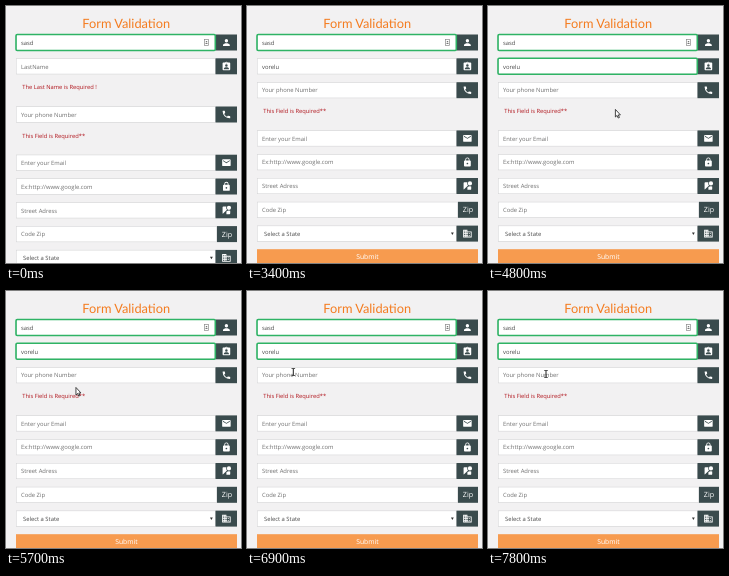
These frames come from a looping animation (235x257 px, 8 s). An HTML page with a canvas:

```html
<!DOCTYPE html>
<html lang="en">
<head>
<meta charset="utf-8">
<title>Form Validation</title>
<style>
html, body { margin: 0; width: 235px; height: 257px; overflow: hidden; background: #f2f1f2; }
canvas { display: block; width: 235px; height: 257px; }
</style>
</head>
<body>
<canvas id="stage"></canvas>
<script>
const W = 235, H = 257, LOOP = 8000;
const FILLED = 3400, VALID = 4400, POINTER_IN = 4300;
const BODY = '"Open Sans", "Noto Sans", sans-serif', HEAD = 'Lato, sans-serif';
const DARK = '#3a4b4d', GREEN = '#2fb365', RED = '#b0141c', INK = '#4a4a4a', HINT = '#6f6f6f';

const canvas = document.getElementById('stage');
const ctx = canvas.getContext('2d');
const dpr = window.devicePixelRatio || 1;
canvas.width = W * dpr;
canvas.height = H * dpr;

// 24 x 24 glyphs
const icons = {
  person: 'M12 12a4 4 0 1 0 0-8a4 4 0 0 0 0 8zm0 2c-2.7 0-8 1.3-8 4v2h16v-2c0-2.7-5.3-4-8-4z',
  badge: 'M19 3h-4.2a3 3 0 0 0-5.6 0H5a2 2 0 0 0-2 2v14a2 2 0 0 0 2 2h14a2 2 0 0 0 2-2V5a2 2 0 0 0-2-2z' +
    'm-7 0a1 1 0 1 1 0 2a1 1 0 0 1 0-2zm0 4a3 3 0 1 1 0 6a3 3 0 0 1 0-6zm6 12H6v-1.4c0-2 4-3.1 6-3.1s6 1.1 6 3.1z',
  phone: 'M6.6 10.8c1.5 2.8 3.8 5.1 6.6 6.6l2.2-2.2q.5-.5 1-.3q1.7.6 3.6.6a1 1 0 0 1 1 1V20a1 1 0 0 1-1 1' +
    'A17 17 0 0 1 3 4a1 1 0 0 1 1-1h3.5a1 1 0 0 1 1 1q0 1.9.6 3.6q.2.5-.3 1z',
  mail: 'M20 4H4a2 2 0 0 0-2 2v12a2 2 0 0 0 2 2h16a2 2 0 0 0 2-2V6a2 2 0 0 0-2-2zm0 4l-8 5l-8-5V6l8 5l8-5z',
  lock: 'M18 8h-1V6A5 5 0 0 0 7 6v2H6a2 2 0 0 0-2 2v10a2 2 0 0 0 2 2h12a2 2 0 0 0 2-2V10a2 2 0 0 0-2-2z' +
    'm-6 9a2 2 0 1 1 0-4a2 2 0 0 1 0 4zm3.1-9H8.9V6a3.1 3.1 0 0 1 6.2 0z',
  street: 'M12.6 14.3q-.6.5-.6 1.2V21h7a2 2 0 0 0 2-2v-6q-4.5-1.5-8.4 1.3z' +
    'M18 1a5 5 0 1 1 0 10a5 5 0 0 1 0-10zM11.5 6q0-1.6.7-3H5a2 2 0 0 0-2 2v14q0 .9.6 1.4l9.8-9.8Q11.5 8.8 11.5 6z',
  building: 'M12 7V3H2v18h20V7zM4 5h2v2H4zm0 4h2v2H4zm0 4h2v2H4zm0 4h2v2H4zM8 5h2v2H8zm0 4h2v2H8z' +
    'm0 4h2v2H8zm0 4h2v2H8zM12 9h8v10h-8v-2h2v-2h-2v-2h2v-2h-2zM16 11h2v2h-2zm0 4h2v2h-2z'
};
for (const k in icons) icons[k] = new Path2D(icons[k]);

const arrow = new Path2D('M0 0V7.6L1.7 6L2.8 8.6L4 8.1L2.9 5.5H5Z');

// [time, x, y] of the pointer
const path = [
  [4300, 127.4, 103.4], [5200, 127.4, 103.4], [5700, 70, 96.5],
  [6000, 54, 82], [6450, 44.5, 81], [6900, 46.3, 81], [7000, 47, 81.2], [7600, 58, 83]
];

const rows = [
  ['Enter your Email', 'mail'], ['Ex:http://www.google.com', 'lock'],
  ['Street Adress', 'street'], ['Code Zip', 'Zip']
];

function text(str, x, y, size, color, align = 'left', font = BODY) {
  ctx.font = size + 'px ' + font;
  ctx.textAlign = align;
  ctx.fillStyle = color;
  ctx.fillText(str, x, y);
}

function box(x, y, w, h, color) {
  ctx.fillStyle = color;
  ctx.fillRect(x, y, w, h);
}

function addon(name, x, y) {
  box(x, y - 8, 231 - x, 16, DARK);
  if (!icons[name]) {
    text(name, (x + 231) / 2, y + 2.5, 7.2, '#fff', 'center');
    return;
  }
  ctx.save();
  ctx.translate(215.3, y - 5.1);
  ctx.scale(0.425, 0.425);
  ctx.fillStyle = '#fff';
  ctx.fill(icons[name], 'evenodd');
  ctx.restore();
}

function field(y, label, icon, { color = HINT, valid = false, indent = 15 } = {}) {
  const right = icons[icon] ? 209.5 : 211;
  box(10, y - 8, right - 10, 16, '#cfcfd1');
  box(10.5, y - 7.5, right - 11, 15, '#fff');
  addon(icon, right, y);
  if (valid) {
    ctx.strokeStyle = GREEN;
    ctx.lineWidth = 1.6;
    ctx.beginPath();
    ctx.roundRect(10, y - 8, 199.3, 16, 1.2);
    ctx.stroke();
  }
  text(label, indent, y + 2.2, 5.85, color);
}

function card(x, y) {
  ctx.strokeStyle = '#8b8b8b';
  ctx.lineWidth = 0.7;
  ctx.strokeRect(x - 2, y - 3, 4, 6);
  box(x - 0.7, y - 1.5, 1.4, 1.3, '#777');
  box(x - 1, y + 0.5, 2, 1, '#777');
}

function pointer(t) {
  if (t < POINTER_IN) return;
  let i = 0;
  while (i < path.length - 2 && t >= path[i + 1][0]) i++;
  const [t0, x0, y0] = path[i], [t1, x1, y1] = path[i + 1];
  const k = Math.min(1, (t - t0) / (t1 - t0));
  const x = x0 + (x1 - x0) * k, y = y0 + (y1 - y0) * k;
  ctx.save();
  ctx.translate(x, y);
  if (y > 92) {
    ctx.strokeStyle = '#333';
    ctx.lineWidth = 0.9;
    ctx.fillStyle = '#fff';
    ctx.fill(arrow);
    ctx.stroke(arrow);
  } else {
    box(-0.5, -3.5, 1, 7, '#222');
    box(-1.8, -4, 3.6, 0.8, '#333');
    box(-1.8, 3.2, 3.6, 0.8, '#333');
  }
  ctx.restore();
}

function draw(t) {
  const filled = t >= FILLED;
  const top = filled ? 84.2 : 108.5;
  const rowY = i => top + 48.2 + i * 23.8;
  ctx.setTransform(dpr, 0, 0, dpr, 0, 0);
  ctx.textRendering = 'geometricPrecision';
  box(0, 0, W, H, '#f2f1f2');
  text('Form Validation', 120.2, 21.6, 12.8, '#f47c20', 'center', HEAD);

  field(36.5, 'sasd', 'person', { color: INK, valid: true });
  card(200.5, 36.5);
  field(60.3, filled ? 'vorelu' : 'LastName', 'badge',
    { color: filled ? INK : HINT, valid: t >= VALID });
  if (!filled) text('The Last Name is Required !', 16.3, 83.3, 5.75, RED);

  field(top, 'Your phone Number', 'phone');
  text('This Field is Required**', 16.3, top + 23, 5.75, RED);

  rows.forEach(([label, icon], i) => field(rowY(i), label, icon));

  const y = rowY(rows.length);
  field(y, 'Select a State', 'building', { color: INK, indent: 17 });
  ctx.fillStyle = '#333';
  ctx.fill(new Path2D(`M204 ${y - 1.2}h2.8l-1.4 2.5z`));

  if (filled) {
    box(10, 243.2, 221, 16, '#f79b4f');
    text('Submit', 120.4, 253.4, 6.8, '#fff', 'center');
  }
  pointer(t);
}

function tick(now) {
  draw(now % LOOP);
  requestAnimationFrame(tick);
}
draw(0);
requestAnimationFrame(tick);
</script>
</body>
</html>
```
